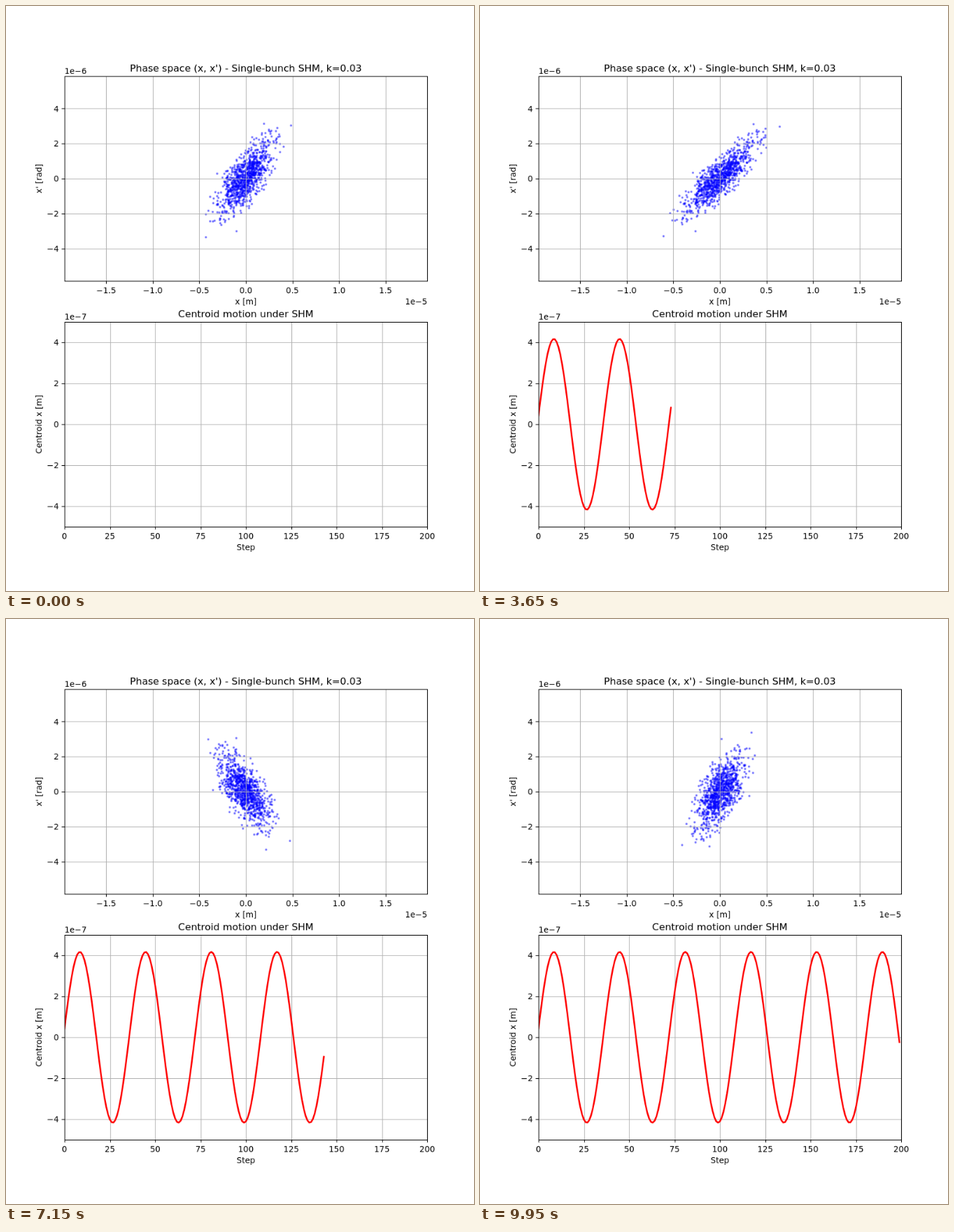
Recreate the animation shown at these times as an HTML page with a canvas. Size 669 by 837 pixels, loop 10 s.

```html
<!DOCTYPE html>
<html lang="en">
<head>
<meta charset="utf-8">
<title>Phase space</title>
<style>
  html, body { margin: 0; width: 100%; height: 100%; overflow: hidden; background: #fff; }
  canvas { display: block; }
</style>
</head>
<body>
<canvas id="stage" width="669" height="837"></canvas>
<script>
// The figure is drawn at 800 x 1000 and scaled down to the stage.
const FIG_W = 800, FIG_H = 1000;
const stage = document.getElementById('stage');
const screen2d = stage.getContext('2d');
const figure = document.createElement('canvas');
figure.width = FIG_W;
figure.height = FIG_H;
const ctx = figure.getContext('2d');

const LEFT = 100, RIGHT = 720, AXES_H = 350, MID = (LEFT + RIGHT) / 2;
const TOP_Y = 120, BOTTOM_Y = 540;
const STEP_MS = 50, STEPS = 200;
const PT = 100 / 72;

// Kick-drift map p -= K x, x += p, in units of 1e-6.
const K = 0.03;
const OMEGA = Math.acos(1 - K / 2);
const AMPLITUDE = 4.17, PHASE = 0.103;

const phaseX = x => MID + x * 15.92;
const phaseY = p => TOP_Y + AXES_H / 2 - p * 29.93;
const stepX = n => LEFT + n * 3.1;
const centroidY = c => BOTTOM_Y + AXES_H / 2 - c * 35;

// Sparse particles around the edge of the bunch: [x, p]
const halo = [
  [4.85, 3.03], [1.95, 3.13], [3.38, 2.89], [2.48, 2.8], [2.74, 2.73],
  [3.23, 2.71], [3.57, 2.52], [0.68, 2.36], [4.06, 1.82], [3.31, 2.08],
  [-4.29, -3.35], [-1, -3.01], [-2.63, -2.65], [-3.83, -2.44], [-3.53, -2.45],
  [-4.29, -2.04], [-4.02, -1.84], [-3.08, 0.28], [3.31, 1.08], [1.73, 2.6],
  [2.1, 2.6], [-2.78, -2.28], [-3.83, -1.04], [2.56, 0.2], [-1.95, 0.16]
];

function seededRandom(seed) {
  return () => {
    seed = (seed + 0x6D2B79F5) | 0;
    let t = Math.imul(seed ^ (seed >>> 15), 1 | seed);
    t = (t + Math.imul(t ^ (t >>> 7), 61 | t)) ^ t;
    return ((t ^ (t >>> 14)) >>> 0) / 4294967296;
  };
}

function makeBunch(count) {
  const random = seededRandom(42);
  const bunch = halo.slice();
  while (bunch.length < count) {
    const r = Math.sqrt(-2 * Math.log(1 - 0.977 * random()));
    const a = 2 * Math.PI * random();
    const x = r * Math.cos(a) - 0.03;
    const p = r * Math.sin(a) + 0.07 - K * x;
    bunch.push([x + p, p]);
  }
  return bunch;
}
const bunch = makeBunch(1000);

// n-th power of the one-step matrix [[1 - K, 1], [-K, 1]]
function transfer(n) {
  const u = Math.sin(n * OMEGA) / Math.sin(OMEGA);
  const v = Math.sin((n - 1) * OMEGA) / Math.sin(OMEGA);
  return [(1 - K) * u - v, u, -K * u, u - v];
}

// Puts thin lines on pixel centres.
const snap = v => Math.round(v) + 0.5;

function line(x1, y1, x2, y2, color) {
  ctx.strokeStyle = color;
  ctx.beginPath();
  ctx.moveTo(x1, y1);
  ctx.lineTo(x2, y2);
  ctx.stroke();
}

function text(str, x, y, align = 'center', points = 10) {
  ctx.fillStyle = '#000';
  ctx.font = `${points * PT}px "DejaVu Sans", sans-serif`;
  ctx.textAlign = align;
  ctx.fillText(str, x, Math.round(y));
}

function sideText(str, x, y) {
  ctx.save();
  ctx.translate(x, y);
  ctx.rotate(-Math.PI / 2);
  text(str, 0, 0);
  ctx.restore();
}

function clipped(top, draw) {
  ctx.save();
  ctx.beginPath();
  ctx.rect(LEFT, top, RIGHT - LEFT, AXES_H);
  ctx.clip();
  draw();
  ctx.restore();
}

const signed = (v, digits = 0) => v.toFixed(digits).replace('-', '\u2212');
const yTicks = [-4, -2, 0, 2, 4];

const phasePlot = {
  top: TOP_Y, title: "Phase space (x, x') - Single-bunch SHM, k=0.03",
  xLabel: 'x [m]', yLabel: "x' [rad]", yScale: '1e\u22126', xScale: '1e\u22125',
  xTicks: [-1.5, -1, -0.5, 0, 0.5, 1, 1.5], xDigits: 1,
  toX: v => phaseX(v * 10), toY: phaseY
};
const centroidPlot = {
  top: BOTTOM_Y, title: 'Centroid motion under SHM',
  xLabel: 'Step', yLabel: 'Centroid x [m]', yScale: '1e\u22127', xScale: '',
  xTicks: [0, 25, 50, 75, 100, 125, 150, 175, 200], xDigits: 0,
  toX: stepX, toY: centroidY
};

function drawGrid(plot) {
  ctx.lineWidth = 0.8 * PT;
  ctx.lineCap = 'butt';
  for (const v of plot.xTicks) {
    const x = snap(plot.toX(v));
    line(x, plot.top, x, plot.top + AXES_H, '#b0b0b0');
  }
  for (const v of yTicks) {
    const y = snap(plot.toY(v));
    line(LEFT, y, RIGHT, y, '#b0b0b0');
  }
}

function drawAxes(plot) {
  const bottom = plot.top + AXES_H, tick = 3.5 * PT;
  ctx.lineWidth = 0.8 * PT;
  ctx.lineCap = 'butt';
  for (const v of plot.xTicks) {
    const x = snap(plot.toX(v));
    line(x, bottom, x, bottom + tick, '#000');
    text(signed(v, plot.xDigits), plot.toX(v), bottom + 21);
  }
  for (const v of yTicks) {
    const y = snap(plot.toY(v));
    line(LEFT, y, LEFT - tick, y, '#000');
    text(signed(v), LEFT - 2 * tick, plot.toY(v) + 5.3, 'right');
  }
  ctx.strokeStyle = '#000';
  ctx.strokeRect(snap(LEFT), snap(plot.top), RIGHT - LEFT, AXES_H);
  text(plot.title, MID, plot.top - 8.3, 'center', 12);
  text(plot.xLabel, MID, bottom + 40.3);
  text(plot.yScale, LEFT, plot.top - 4.2, 'left');
  text(plot.xScale, RIGHT, bottom + 40, 'right');
  sideText(plot.yLabel, 61, plot.top + AXES_H / 2);
}

function drawBunch(step) {
  const [a, b, c, d] = transfer(step);
  const radius = Math.SQRT2 / 2 * PT;
  ctx.fillStyle = ctx.strokeStyle = 'rgba(0, 0, 255, 0.4)';
  ctx.lineWidth = 1.5 * PT;
  for (const [x, p] of bunch) {
    ctx.beginPath();
    ctx.arc(phaseX(a * x + b * p), phaseY(c * x + d * p), radius, 0, 2 * Math.PI);
    ctx.fill();
    ctx.stroke();
  }
}

function drawCentroid(step) {
  if (step < 1) return;
  ctx.strokeStyle = '#f00';
  ctx.lineWidth = 2 * PT;
  ctx.lineCap = 'square';
  ctx.lineJoin = 'round';
  ctx.beginPath();
  for (let n = 0; n <= step; n++) {
    ctx.lineTo(stepX(n), centroidY(AMPLITUDE * Math.sin(OMEGA * n + PHASE)));
  }
  ctx.stroke();
}

function draw(step) {
  ctx.fillStyle = '#fff';
  ctx.fillRect(0, 0, FIG_W, FIG_H);
  clipped(TOP_Y, () => drawBunch(step));
  drawGrid(phasePlot);
  drawAxes(phasePlot);
  drawGrid(centroidPlot);
  clipped(BOTTOM_Y, () => drawCentroid(step));
  drawAxes(centroidPlot);
  screen2d.drawImage(figure, 0, 0, stage.width, stage.height);
}

let shown = -1;
const start = performance.now();
function tick() {
  const step = Math.floor((performance.now() - start) / STEP_MS) % STEPS;
  if (step !== shown) draw(shown = step);
  requestAnimationFrame(tick);
}
tick();
</script>
</body>
</html>
```
